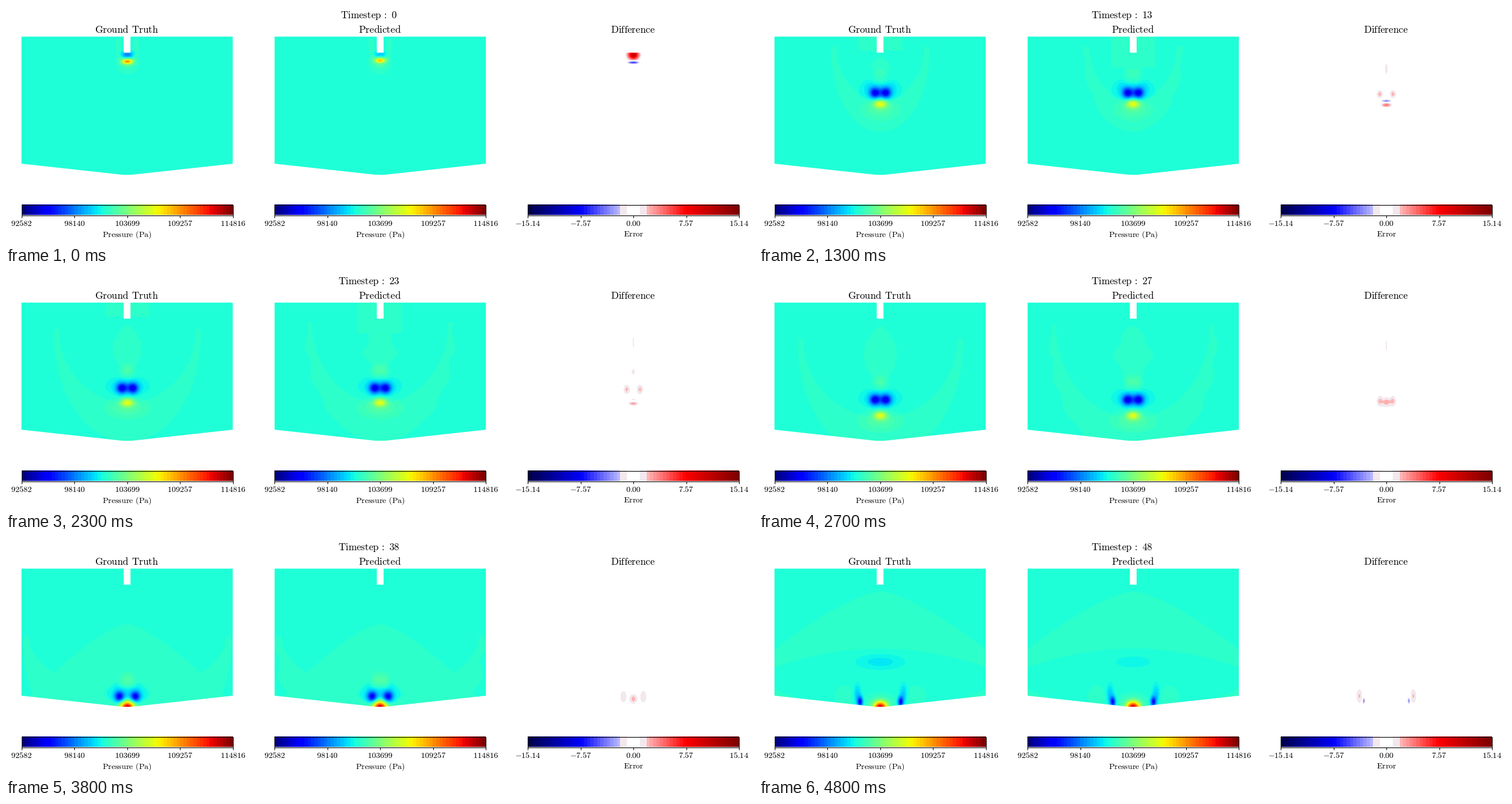
A matplotlib script that plays this animation: 1280x409 px, repeating every 4900 ms.

```python
import numpy as np
import matplotlib as mpl
import matplotlib.pyplot as plt
from matplotlib.animation import FuncAnimation
from matplotlib.patches import PathPatch, Rectangle
from matplotlib.path import Path

mpl.rcParams["mathtext.fontset"] = "cm"

W, H, DPI = 1280, 409, 100
STEPS, INTERVAL = 49, 100
LEFT, PITCH, HALF = 26.5, 433.75, 181
TOP, BOTTOM, RISE = 52.6, 290, 19
NOZZLE, MOUTH = 5.8, 80.2         # half-width and lower end of the inlet
BANDS = 64
AMBIENT = 0.387                   # undisturbed pressure on the colour scale
UNIT = 1 / 31                     # colour-scale size of a strength of one
MAX_ERROR = 15.14

cols = np.arange(-HALF - 1, HALF + 1) + 0.5
rows = np.arange(51, 292) + 0.5
X, Y = np.meshgrid(cols, rows)
AX = np.abs(X)

jet, seismic = mpl.colormaps["jet"], mpl.colormaps["seismic"]


def rgb(cmap, v):
    return cmap(v, bytes=True)[..., :3]


def error_colors():
    table = rgb(seismic, np.arange(BANDS) / (BANDS - 1))
    ring = np.abs(np.arange(BANDS) - (BANDS - 1) / 2)
    table[ring < 4] = (243, 232, 238)
    table[ring < 2] = 255
    return table


JET_BAR = rgb(jet, np.arange(BANDS) / (BANDS - 1))
ERR_BAR = error_colors()


def ramp(t, start, end):
    u = np.clip((t - start) / (end - start), 0, 1)
    return u * u * (3 - 2 * u)


def blob(x, y, sx, sy, strength):
    """Gaussian mirrored about the axis; a single one when x is 0."""
    pair = np.exp(-((X - x) / sx) ** 2 / 2) + np.exp(-((X + x) / sx) ** 2 / 2)
    pair /= 1 + np.exp(-2 * (x / sx) ** 2)
    return strength * pair * np.exp(-((Y - y) / sy) ** 2 / 2)


def dip(a, cy, bottom):
    """Half-width of a U shape at every height."""
    u = np.clip((Y - cy) / (bottom - cy), 0, 1)
    return a * np.sqrt(1 - u ** 2)


class Jet:
    """Place of the vortex pair and of the pressure front at step t."""

    def __init__(self, t):
        self.grow = 1 - np.exp(-t / 4)
        self.hit = max(t - 36, 0)           # steps since reaching the floor
        self.spread = self.hit / 12
        self.x = 4 + 5.5 * self.grow + 2.1 * self.hit
        self.y = min(84 + 5.03 * t, 272 + 0.9 * (t - 37.4))
        self.front = min(self.y + 11.5 + 0.56 * t, 291)


def faint_region(t, flow, pred):
    # crescent of the expanding shock
    reach = 20 + 5.3 * t - 0.03 * t * t
    tip = 57 + 0.078 * t * t
    low = 106 + 9 * t - 0.04 * t * t
    inner_low = min(80 + 6.3 * t, 262) + 3 * max(t - 38, 0)
    outer = dip(reach, tip + 10, low)
    if pred:
        outer = outer * (1 + 0.025 * np.sin(Y / 9))
        tip -= 25 * ramp(t, 18, 28) * (1 - ramp(t, 33, 38))
    mask = (AX < outer) & (AX > dip(reach - 9, tip, inner_low)) & (Y > tip)

    # trail behind the vortex
    y0 = 82 + 0.4 * t
    y1 = max(flow.y - 28, y0 + 1)
    u = np.clip((Y - y0) / (y1 - y0), 0, 1)
    width = (4 + 0.9 * t) * np.sin(np.pi * u) ** 0.7 * (1 - ramp(t, 33, 37))
    if pred:
        width = width * (1.05 + 0.2 * np.sin(Y / 7))
    mask |= AX < width

    # echo beside the inlet
    if 12 <= t <= 24:
        mask |= (AX < 38) & (Y < (105 if pred else 77))

    # mound of the wave thrown back by the floor
    if t >= 34:
        s = t - 34
        roof = 170 - 5.6 * s + (100 + 500 * np.exp(-s / 1.6)) * (AX / HALF) ** 1.4
        under = 190 + 32 * (AX / HALF) ** 2 + (STEPS - 1 - t) * 15
        mask |= (Y > roof) & (Y < under)
    return mask


def pressure(t, pred=False):
    f = Jet(t)
    early = np.exp(-t / 3)
    bounce = ramp(t, 32, 38)
    soft = early if pred else 0
    d = blob(f.x, f.y, 4.3 + 1.9 * f.grow - 0.25 * f.hit, 4 + 2.2 * f.grow,
             -(4 + 4 * f.grow) * (1 - 0.5 * soft))
    d += blob(0, f.y - 3, 10 + 9 * f.grow, 5 + 5 * f.grow,
              -(0.6 + 1.3 * f.grow) * (1 - ramp(f.hit, 0, 8)))
    d += blob(0, f.front - 2 * soft, 8 - 1.5 * early, 5 + 2 * bounce - 2 * early,
              6.5 + 3.5 * early + 9.5 * bounce - 1.6 * soft)
    d += blob(0, min(f.front + 10 * f.grow, 287), min(11 + 0.75 * t, 24 - 7 * bounce),
              12, 1.4)
    d += blob(7 if pred else 0, f.y - 28, 6 if pred else 9, 9,
              1.5 * ramp(t, 4, 20) * (1 - ramp(t, 39, 44)))
    # low pressure: wings of the young vortex, late arcs and suction
    d += blob(20, f.y - 13, 7, 7, -np.exp(-((t - 8) / 6) ** 2))
    d += blob(f.x + 5, f.y - 13, 4, 11, -2 * f.spread)
    late = ramp(t, 42, 47)
    d += blob(0, 213, 25, 8, -(0.5 if pred else 1.1) * late)
    d += blob(62, 272, 12, 14, 0.6 * late)
    d += 0.4 * (faint_region(t, f, pred) & (d > -0.2))
    return rgb(jet, np.clip(AMBIENT + np.round(2 * d) / 2 * UNIT, 0, 1))


def error(t):
    f = Jet(t)
    early = np.exp(-t / 2.5)
    late = ramp(t, 22, 26) * (1 - ramp(t, 40, 44))
    e = blob(0, 84, 6.2, 5.5, 11 * early)
    e += blob(f.x + 2 + 0.8 * f.hit, f.y + 2 - f.hit, 4, 3.5 + 0.12 * t,
              (2 + 1.5 * np.exp(-t / 10)) * f.grow)
    e += blob(0, f.front + 2, 6, 2.5, 4 * f.grow * (1 - ramp(t, 20, 28)))
    e += blob(0, f.front - 5 + 6.5 * early, 6, 1.6,
              -(3.5 + 3 * early) * (1 - ramp(t, 20, 25)))
    e += blob(0, f.y + 4, 5, 6, 2.4 * late)
    e += blob(f.x + 4, f.y - 2, 1.5, 4, -3.5 * f.spread)
    e += blob(0, f.y - 28, 4, 7, 1.5 * ramp(t, 12, 16) * (1 - ramp(t, 20, 30)))
    e += blob(0, 90 + 1.35 * t, 0.6 + 3.6 * np.exp(-t / 14), 8,
              1.6 * f.grow * (1 - ramp(t, 33, 37)))
    e *= Y > MOUTH
    k = np.floor((e / MAX_ERROR + 1) / 2 * BANDS)
    return ERR_BAR[np.clip(k, 0, BANDS - 1).astype(int)]


fig = plt.figure(figsize=(W / DPI, H / DPI), dpi=DPI, facecolor="white")
ax = fig.add_axes([0, 0, 1, 1])
ax.axis("off")


def roman(s):
    return r"$\mathrm{%s}$" % s.replace(" ", r"\hspace{0.38}")


def label(x, y, s, px):
    return ax.text(x, y, roman(s), fontsize=px * 72 / DPI, color="black",
                   ha="center", va="baseline")


def picture(img, x0, x1, y0, y1):
    return ax.imshow(img, extent=(x0, x1, y1, y0), aspect="auto",
                     interpolation="nearest", origin="upper")


def cover(mid):
    """White frame that leaves only the tank open."""
    frame = [(-HALF - 3, 48), (HALF + 3, 48), (HALF + 3, 295), (-HALF - 3, 295)]
    right = [(NOZZLE, MOUTH), (NOZZLE, TOP), (HALF, TOP),
             (HALF, BOTTOM - RISE), (8, BOTTOM)]
    tank = right + [(-x, y) for x, y in reversed(right)]
    loops = [Path(np.add(p + p[:1], (mid, 0)), closed=True)
             for p in (frame, tank[::-1])]
    ax.add_patch(PathPatch(Path.make_compound_path(*loops), fc="white", lw=0))


def colorbar(left, colors, ticks, name, base):
    x0, x1, y0, y1 = left, left + 2 * HALF, 341.5, 359.5
    picture(colors[None], x0, x1, y0, y1)
    ax.add_patch(Rectangle((x0, y0), x1 - x0, y1 - y0, fill=False,
                           ec="black", lw=0.8))
    for x, s in zip(np.linspace(x0, x1, len(ticks)), ticks):
        ax.plot([x, x], [y1, y1 + 4.5], color="black", lw=0.8,
                solid_capstyle="butt")
        label(x, 378, s, 14.1)
    label((x0 + x1) / 2, base, name, 14.1)


P_BAR = (JET_BAR, [str(int(v)) for v in np.linspace(92582, 114816, 5)],
         "Pressure (Pa)", 397)
E_BAR = (ERR_BAR, ["%.2f" % v for v in np.linspace(-MAX_ERROR, MAX_ERROR, 5)],
         "Error", 396)

panels = []
for i, (name, bar) in enumerate((("Ground Truth", P_BAR), ("Predicted", P_BAR),
                                 ("Difference", E_BAR))):
    left = LEFT + i * PITCH
    mid = left + HALF
    blank = np.full(X.shape + (3,), 255, np.uint8)
    panels.append(picture(blank, left - 1, left + 2 * HALF + 1, 51, 292))
    cover(mid)
    label(mid - 0.5, 46, name, 17.2)
    colorbar(left, *bar)
title = label(622, 21, "", 17.1)

ax.set_xlim(0, W)
ax.set_ylim(H, 0)


def draw(t):
    panels[0].set_data(pressure(t))
    panels[1].set_data(pressure(t, pred=True))
    panels[2].set_data(error(t))
    title.set_text(roman(r"Timestep\hspace{0.18}:\hspace{0.305}%d" % t))
    return (*panels, title)


anim = FuncAnimation(fig, draw, frames=STEPS, interval=INTERVAL,
                     repeat=True, repeat_delay=0, blit=False)
plt.show()
```
